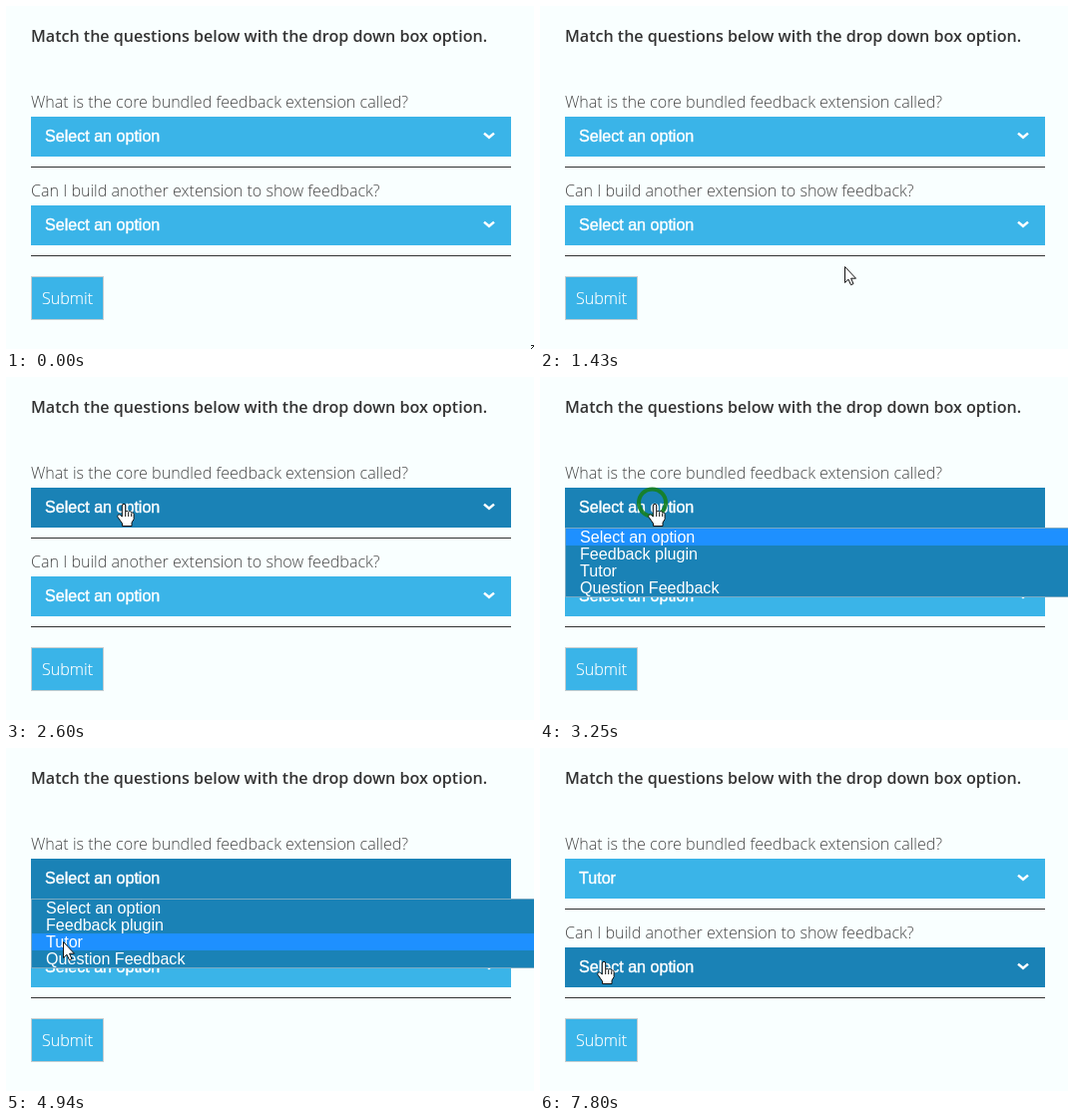
Write an HTML page that moves like this. It is 529 px wide and 344 px high and loops after 8000 ms.

```html
<!DOCTYPE html>
<html lang="en">
<head>
<meta charset="utf-8">
<title>Drop down quiz</title>
<style>
  html, body { margin: 0; width: 100%; height: 100%; overflow: hidden; background: #f9ffff; }
  svg { display: block; width: 529px; height: 344px; font-size: 16.08px; }
  .title { font-weight: 600; font-family: "Open Sans", sans-serif; fill: #333; }
  .light { font-weight: 300; font-family: "Open Sans", sans-serif; fill: #444; }
  .ui { font-family: "Liberation Sans", Arial, sans-serif; fill: #fff; }
  .select .ui { stroke: #fff; stroke-width: .4; }
  .submit { fill: #fff; stroke: #fff; stroke-width: .2; }
  .chevron { fill: none; stroke: #fff; stroke-width: 2.5; }
  .cursor { fill: #fff; stroke: #111; stroke-linejoin: round; }
  .line { fill: none; stroke: #222; }
</style>
</head>
<body>
<svg viewBox="0 0 529 344" xmlns="http://www.w3.org/2000/svg">
  <defs>
    <g id="closed">
      <rect width="481" height="40"/>
      <path class="chevron" d="M454 16.6 459 20.8 464 16.6"/>
    </g>
  </defs>
  <rect width="529" height="344" fill="#f9ffff"/>
  <text class="title" x="25" y="36">Match the questions below with the drop down box option.</text>
  <text class="light" x="25" y="102">What is the core bundled feedback extension called?</text>
  <text class="light" x="25" y="191">Can I build another extension to show feedback?</text>
  <path d="M25 161.5H506M25 250.5H506" stroke="#333"/>
  <g class="select" transform="translate(25 111)">
    <use href="#closed"/>
    <text class="ui" x="14" y="25">Select an option</text>
  </g>
  <g class="select" transform="translate(25 200)">
    <use href="#closed"/>
    <text class="ui" x="14" y="25">Select an option</text>
  </g>
  <rect x="25.5" y="271.5" width="72" height="43" fill="#3ab4e8" stroke="#c3cdd0"/>
  <text class="light submit" x="36" y="299">Submit</text>
  <g id="menu">
    <rect id="cover" x="25" y="111" width="481" height="40" fill="#1a82b6"/>
    <text class="ui" x="39" y="136" stroke="#fff" stroke-width=".4">Select an option</text>
    <rect x="25.5" y="151.5" width="510" height="69" fill="#1a82b6" stroke="#79a9c2"/>
    <rect id="highlight" x="26" width="503" height="17" fill="#1e90ff"/>
  </g>
  <circle id="ring" fill="none" stroke="#16801f" stroke-width="4"/>
  <g id="pointer">
    <path id="arrow" class="cursor" d="M.5 .5V16.5L4 13.2 6.5 18.7 9 17.6 6.6 12.2H11.5Z"/>
    <g id="hand" class="cursor">
      <path d="M-1.7 13V2a1.7 1.7 0 0 1 3.4 0V8.5a1.6 1.6 0 0 1 3 0a1.6 1.6 0 0 1 3 .8a1.5 1.5 0 0 1 2.4 1.2V15.5L8 19V22.5H-1.5V20L-6 13.5C-7 11.5-4.5 10-3.3 11.6Z"/>
      <path fill="none" d="M1.7 8.5V13M4.7 9V13M7.7 10V13"/>
    </g>
    <path id="beam" class="line" d="M-3.5-7.5H-1L.5-6.5 2-7.5H4.5M.5-6.5V7.5M-3.5 8.5H-1L.5 7.5 2 8.5H4.5"/>
    <path id="resize" class="line" d="M-3 3 2-2M-1-2.5H2.5V1"/>
  </g>
</svg>
<script>
const LOOP = 8000, TICK = 130;
const OPEN = 25, CLOSE = 47;
const LIGHT = "#3ab4e8", DARK = "#1a82b6";
const byId = id => document.getElementById(id);
const selects = [...document.querySelectorAll(".select")];
const tops = [111, 200];
const cursors = ["arrow", "hand", "beam", "resize"];
const options = ["Select an option", "Feedback plugin", "Tutor", "Question Feedback"];

// Each move starts where the last one ended; bend is the curve's control point.
const home = [527, 343];
const moves = [
  { first: 1, steps: 7, bend: [400, 130], to: [325, 299] },
  { first: 9, steps: 3, to: [305, 261] },
  { first: 14, steps: 8, bend: [214, 137], to: [115, 127] },
  { first: 32, steps: 7, to: [57, 194] },
  { first: 56, steps: 5, to: [64, 214] }
];

options.forEach((label, i) => {
  const text = document.createElementNS("http://www.w3.org/2000/svg", "text");
  text.setAttribute("class", "ui");
  text.setAttribute("x", 40);
  text.setAttribute("y", 166 + 17 * i);
  text.textContent = label;
  byId("menu").append(text);
});

const show = (el, on) => { el.style.display = on ? "" : "none"; };
const easeOut = p => 1 - (1 - p) ** 2;

function pointerAt(tick) {
  let from = home;
  for (const { first, steps, bend, to } of moves) {
    if (tick < first) break;
    const p = easeOut(Math.min(1, (tick - first + 1) / steps));
    from = from.map((a, i) => {
      const mid = bend ? bend[i] : (a + to[i]) / 2;
      return Math.round((1 - p) ** 2 * a + 2 * p * (1 - p) * mid + p * p * to[i]);
    });
  }
  return from;
}

function cursorFor(x, y, open, hovered) {
  if (x > 515 && y > 335) return "resize";
  if (open) return y < 151 ? "hand" : "arrow";
  if (hovered >= 0) return "hand";
  return x < 375 && y > 176 && y < 200 ? "beam" : "arrow";
}

function drawRing(tick, x, y) {
  const age = tick - (tick < CLOSE ? OPEN : CLOSE);
  const ring = byId("ring");
  show(ring, age === 0 || age === 1);
  ring.setAttribute("cx", x - 2.5);
  ring.setAttribute("cy", y - 1);
  ring.setAttribute("r", age ? 21 : 13.5);
  ring.setAttribute("opacity", age ? .4 : .9);
}

function draw(time) {
  const tick = Math.floor(time % LOOP / TICK);
  const [x, y] = pointerAt(tick);
  const open = tick >= OPEN && tick < CLOSE;
  const hovered = tops.findIndex(top => x >= 25 && x < 506 && y >= top && y < top + 40);

  selects.forEach((select, i) => {
    select.setAttribute("fill", !open && i === hovered ? DARK : LIGHT);
  });
  selects[0].querySelector("text").textContent = options[tick < CLOSE ? 0 : 2];

  show(byId("menu"), open);
  byId("highlight").setAttribute("y", 152 + 17 * Math.max(0, Math.floor((y - 152) / 17)));

  drawRing(tick, x, y);
  const kind = cursorFor(x, y, open, hovered);
  cursors.forEach(id => show(byId(id), id === kind));
  byId("pointer").setAttribute("transform", `translate(${x} ${y})`);
}

const start = performance.now();
function frame() {
  draw(performance.now() - start);
  requestAnimationFrame(frame);
}
frame();
</script>
</body>
</html>
```
